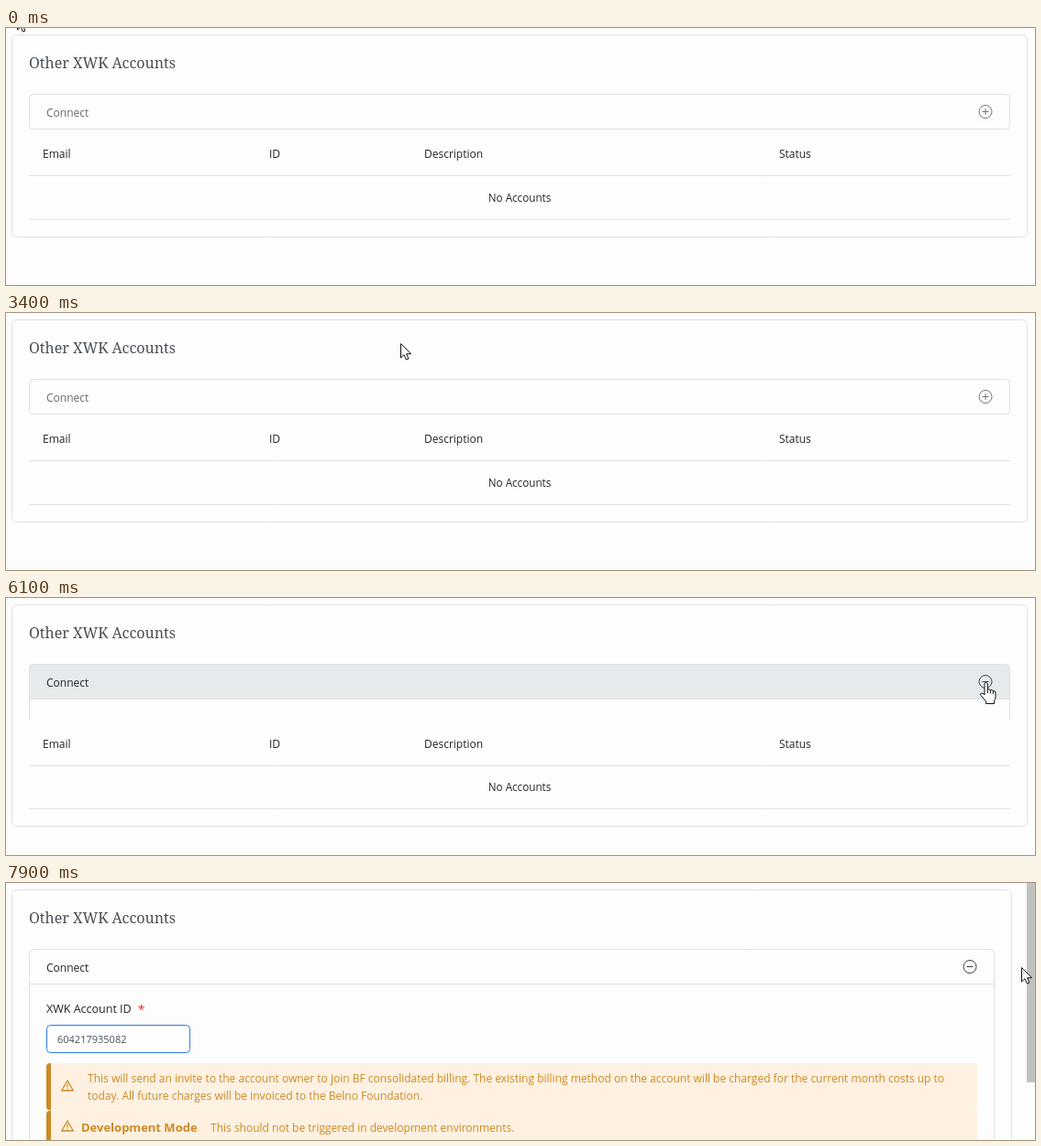
Write an HTML page with a canvas that moves like this. It is 1122 px wide and 281 px high and loops after 8000 ms.

```html
<!DOCTYPE html>
<html lang="en">
<head>
<meta charset="utf-8">
<title>Other Accounts</title>
<style>
  html, body { margin: 0; width: 100%; height: 100%; overflow: hidden; background: #fdfdfd; }
  canvas { display: block; }
</style>
</head>
<body>
<canvas id="stage" width="1122" height="281"></canvas>
<script>
const ctx = document.getElementById('stage').getContext('2d');
const LOOP = 8000, TICK = 100;
const SANS = '"Open Sans", "Noto Sans", sans-serif';
const SERIF = '16px "Noto Serif", serif';
const TITLE = 'Other XWK Accounts';
const PAGE = '#fdfdfd', LINE = '#dee2e6', INK = '#212529', AMBER = '#cc8925';

// time, x, y, kind
const CURSOR = [
  [0, 12, -14, 'arrow'], [100, 12, -14, 'arrow'], [800, 38, 20, 'arrow'],
  [900, 28, 44, 'beam'], [1000, 28, 43, 'beam'], [1300, 26, 43, 'beam'],
  [1500, 26, 43, 'beam'], [1600, 57, 43, 'beam'], [1700, 57, 43, 'beam'],
  [2000, 162, 43, 'beam'], [2200, 162, 43, 'beam'], [2400, 192, 38, 'arrow'],
  [2500, 197, 41, 'arrow'], [3300, 197, 41, 'arrow'], [3400, 430, 33, 'arrow'],
  [3500, 671, 46, 'arrow'], [3700, 671, 46, 'arrow'], [3800, 870, 34, 'arrow'],
  [3900, 870, 34, 'none'], [4300, 1060, 77, 'hand'], [4600, 1074, 100, 'hand'],
  [5000, 1063, 93, 'hand'], [5200, 1063, 93, 'hand'], [5300, 1062, 92, 'hand'],
  [6500, 1062, 92, 'hand'], [6700, 780, 125, 'arrow'], [6900, 200, 160, 'arrow'],
  [7000, 100, 170, 'beam'], [7100, 100, 170, 'beam'], [7200, 250, 120, 'arrow'],
  [7400, 860, 37, 'arrow'], [7700, 1109, 156, 'arrow'], [7800, 1109, 156, 'arrow'],
  [7900, 1107, 92, 'arrow']
];
// time, selected characters of the title
const SELECT = [[0, 0], [1600, 4], [1800, 7], [1900, 11], [2000, 15], [2300, 18], [3100, 0]];
// time, height of the opened panel
const PANEL = [[0, 0], [6000, 6], [6100, 22], [6200, 300]];
// time, height of the scrollbar thumb
const THUMB = [[0, 0], [6200, 250], [6300, 230], [6400, 218]];

const ARROW = new Path2D('M.5.5V16L4 12.7 6.4 18 9 17 6.6 11.7H11.5Z');
const HAND = new Path2D('M5 14V2Q5 .5 6.5 .5T8.3 2V8Q10 7 11.3 8.7 13 7.8 14.3 9.6 17 9 17 12V16Q17 18.5 15.5 20.5V23.5H6.5V21L1 14.5Q0 12.5 1.5 12 3 11.5 5 14Z');
const KNUCKLES = new Path2D('M8.3 8V12M11.3 8.7V12.5M14.3 9.6V13');

const stepAt = (keys, t) => keys.filter(k => k[0] <= t).pop()[1];

function cursorAt(t) {
  const i = CURSOR.filter(k => k[0] <= t).length - 1;
  const a = CURSOR[i], b = CURSOR[i + 1] || a;
  const p = b === a ? 0 : (t - a[0]) / (b[0] - a[0]);
  return {
    x: Math.round(a[1] + (b[1] - a[1]) * p),
    y: Math.round(a[2] + (b[2] - a[2]) * p),
    kind: a[3]
  };
}

function text(str, x, y, color = INK, font = '12px ' + SANS, align = 'left') {
  ctx.font = font;
  ctx.fillStyle = color;
  ctx.textAlign = align;
  ctx.fillText(str, x, y);
}

function line(x1, y1, x2, y2, color = LINE) {
  ctx.strokeStyle = color;
  ctx.beginPath();
  ctx.moveTo(x1, y1);
  ctx.lineTo(x2, y2);
  ctx.stroke();
}

function box(x, y, w, h, r, fill, stroke) {
  ctx.beginPath();
  ctx.roundRect(x, y, w, h, r);
  if (fill) { ctx.fillStyle = fill; ctx.fill(); }
  if (stroke) { ctx.strokeStyle = stroke; ctx.stroke(); }
}

function clipTo(x, y, w, h, draw) {
  ctx.save();
  ctx.beginPath();
  ctx.rect(x, y, w, h);
  ctx.clip();
  draw();
  ctx.restore();
}

function title(count) {
  text(TITLE, 25, 44, '#495057', SERIF);
  if (!count) return;
  const w = Math.round(ctx.measureText(TITLE.slice(0, count)).width);
  clipTo(25, 26, w, 24, () => {
    ctx.fillStyle = '#3367d1';
    ctx.fillRect(25, 26, w, 24);
    text(TITLE, 25, 44, '#fff', SERIF);
  });
}

function toggle(x, open, color) {
  ctx.strokeStyle = color;
  ctx.beginPath();
  ctx.arc(x, 91.5, 7, 0, 7);
  ctx.stroke();
  line(x - 3.5, 91.5, x + 3.5, 91.5, color);
  if (!open) line(x, 88, x, 95, color);
}

function warnSign(x, y) {
  ctx.strokeStyle = AMBER;
  ctx.lineWidth = 1.3;
  ctx.lineJoin = 'round';
  ctx.stroke(new Path2D(`M${x} ${y - 5.5}l6.3 11h-12.6Z`));
  ctx.lineWidth = 1;
  ctx.fillStyle = AMBER;
  ctx.fillRect(x - .6, y - 2, 1.2, 4);
  ctx.fillRect(x - .6, y + 3, 1.2, 1.2);
}

function warning(y, h, right) {
  box(44, y, right - 44, h, 4, '#fef1e1');
  clipTo(44, y, 5, h, () => box(44, y, 20, h, 4, AMBER));
}

function panel(right, height, focus) {
  clipTo(0, 111, 1122, height, () => {
    line(25.5, 111, 25.5, 420);
    line(right - .5, 111, right - .5, 420);
    text('XWK Account ID', 44, 142, INK, '500 12.5px ' + SANS);
    text('*', 144, 143, '#f01818', '500 13px ' + SANS);
    box(44.5, 155.5, 156, 30, 4, '#fff', focus ? '#2f7af0' : '#ced4da');
    text('604217935082', 56, 175, '#495057', '11px ' + SANS);

    warning(197, 51.5, right - 19);
    warnSign(67, 221.5);
    text('This will send an invite to the account owner to join BF consolidated billing. The existing billing method on the account will be charged for the current month costs up to', 89, 218, AMBER);
    text('today. All future charges will be invoiced to the Belno Foundation.', 89, 237, AMBER);

    warning(249, 60, right - 19);
    warnSign(67, 265.5);
    text('Development Mode', 82, 272, AMBER, 'bold 13px ' + SANS);
    text('This should not be triggered in development environments.', 223, 272, AMBER);
  });
}

function table(shift, right) {
  const head = '500 12px ' + SANS, low = Math.max(0, shift - 1);
  text('Email', 40, 142 + shift, INK, head);
  text('ID', 287, 142 + shift, INK, head);
  text('Description', 456, 142 + shift, INK, head);
  text('Status', 843, 142 + shift, INK, head);
  line(25, 161.5 + shift, right, 161.5 + shift);
  text('No Accounts', 560, 190 + low, INK, '11.7px ' + SANS, 'center');
  line(25, 209.5 + low, right, 209.5 + low);
}

function pointer({ x, y, kind }) {
  if (kind === 'none') return;
  ctx.save();
  ctx.translate(x, y);
  if (kind === 'beam') {
    ctx.fillStyle = '#fafafa';
    ctx.fillRect(-1, -8, 2, 17);
    ctx.fillRect(-4, -9, 7, 1);
    ctx.fillRect(-4, 9, 7, 1);
  } else {
    const shape = kind === 'hand' ? HAND : ARROW;
    ctx.fillStyle = '#fff';
    ctx.strokeStyle = '#111';
    ctx.fill(shape);
    ctx.stroke(shape);
    if (kind === 'hand') ctx.stroke(KNUCKLES);
  }
  ctx.restore();
}

function draw(t) {
  const open = stepAt(PANEL, t), thumb = stepAt(THUMB, t);
  const gutter = thumb ? 17 : 0, right = 1095 - gutter;
  const hover = t >= 4300 && t < 6700;
  const low = Math.max(0, open - 1);

  ctx.lineWidth = 1;
  ctx.fillStyle = PAGE;
  ctx.fillRect(0, 0, 1122, 281);
  box(6.5, 7.5, 1107 - gutter, 221 + low, 5, null, LINE);
  title(stepAt(SELECT, t));

  const fill = !hover ? PAGE : open ? '#e6eaed' : '#edf1f5';
  box(25.5, 72.5, right - 26, 38, open ? [4, 4, 0, 0] : 4, fill, LINE);
  text('Connect', 44, 97, hover || open ? INK : '#666b70');
  toggle(right - 27, open, hover || open ? '#3c4248' : '#6c757d');

  if (open) panel(right, open, t >= 7100);
  table(open, right);
  if (thumb) {
    ctx.fillStyle = '#c1c1c1';
    ctx.fillRect(1113, 0, 9, thumb);
  }
  pointer(cursorAt(t));
}

const start = performance.now();
function frame() {
  const t = (performance.now() - start) % LOOP;
  draw(Math.floor(t / TICK) * TICK);
  requestAnimationFrame(frame);
}
frame();
</script>
</body>
</html>
```
